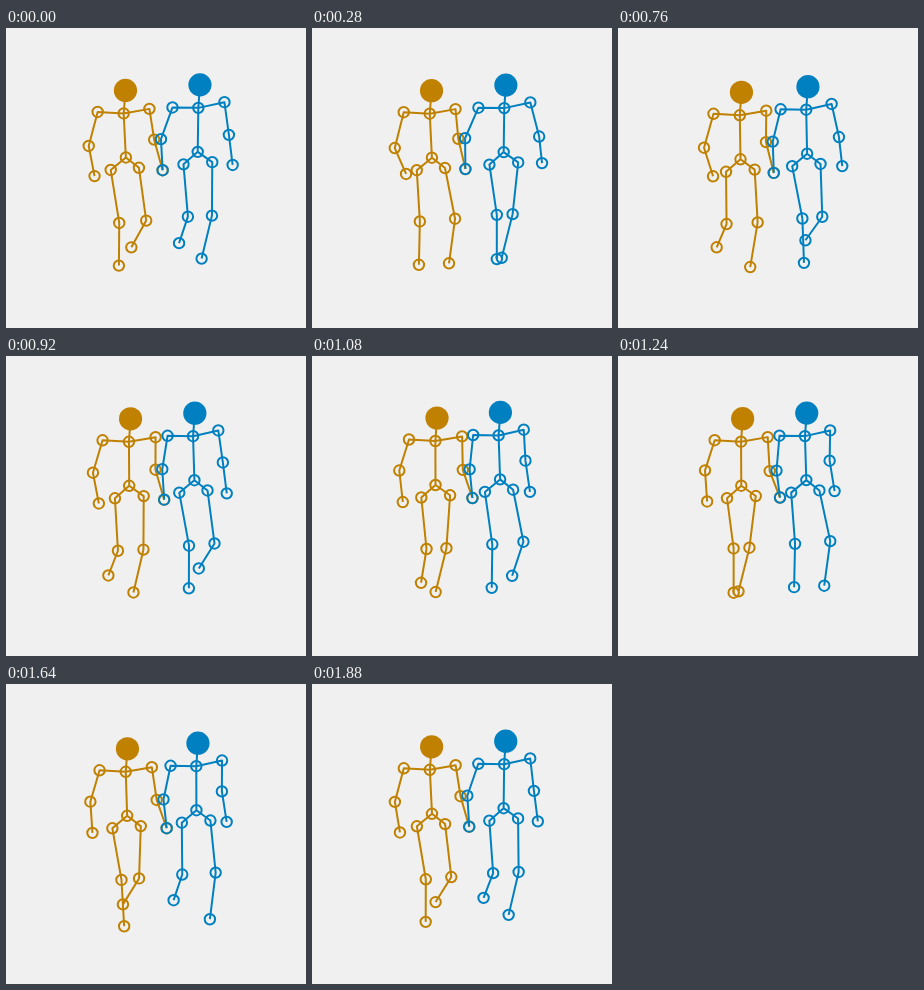
An HTML page that plays this animation: 300x300 px, repeating every 1.92 s.

```html
<!DOCTYPE html>
<html lang="en">
<head>
<meta charset="utf-8">
<title>Walking hand in hand</title>
<style>
  html, body { margin: 0; width: 100%; height: 100%; overflow: hidden; background: #f0f0f0; }
  svg { display: block; width: 100vw; height: 100vh; }
  path, circle { fill: none; stroke: currentColor; stroke-width: 2; stroke-linejoin: round; }
  .head { fill: currentColor; stroke: none; }
</style>
</head>
<body>
<svg id="stage" viewBox="0 0 300 300"></svg>
<script>
const LOOP = 1920, STEP = 40;
const { sin, cos, PI } = Math;

const chains = [
  ["head", "neck", "pelvis"],
  ["neck", "shoulderL", "elbowL", "handL"],
  ["neck", "shoulderR", "elbowR", "handR"],
  ["pelvis", "hipL", "kneeL", "footL"],
  ["pelvis", "hipR", "kneeR", "footR"]
];

// The second walker is the same body half a stride later.
const walkers = [
  { color: "#c08000", phase: 0, x: 0, y: 0, tilt: 0, hipShift: 0, arms: leftWalkerArms },
  { color: "#0080c0", phase: PI, x: 69.2, y: -5.6, tilt: 1.1, hipShift: -0.8, arms: rightWalkerArms }
];

// The body dips twice per stride and sways once.
const bob = a => 1.5 * cos(2 * a + 2.07);
const sway = a => cos(a - 0.56);
const handBob = a => 1.5 * cos(2 * a + 1.05);

function torso(a, { tilt, hipShift }) {
  const at = (x, y, lean) => [x - lean * sway(a), y + bob(a)];
  return {
    head: at(122.1, 63.5, 2.9),
    neck: at(120.4, 86.5, 3),
    shoulderL: at(94.2 + tilt / 2, 85 + tilt, 2.8),
    shoulderR: at(146.6 - tilt / 2, 81.9 - tilt, 3.5),
    pelvis: at(121.6 + hipShift, 130.5, 1.9),
    hipL: at(106.9 + hipShift, 143, 2.4),
    hipR: at(135.4 + hipShift, 140.8, 2.7)
  };
}

// Both legs follow one step cycle; a is the body's phase, p the leg's own.
function knee(x, y, a, p) {
  return [
    x - 5.6 * sin(p) + 1.2 * cos(2 * p - 0.47) + 1.1 * sway(a),
    y + 0.5 * cos(p - 1) + 1.6 * cos(2 * p + 1.24)
  ];
}

function foot(x, y, a, p) {
  return [
    x + 10.2 * cos(p + 1.19) + 1.9 * cos(2 * p - 2.46) + 2.2 * sway(a),
    y + 10.6 * cos(p + 0.52) + 4.8 * cos(2 * p - 2.87)
  ];
}

const legs = a => ({
  kneeL: knee(111.8, 194.5, a, a),
  kneeR: knee(137.3, 192.8, a, a + PI),
  footL: foot(109.5, 233.3, a, a),
  footR: foot(127, 231.9, a, a + PI)
});

// The joined hands and the elbows beside them swing together.
const innerElbow = (x, y, a) => [x - 2.9 * sin(a + 0.16), y - 2.2 * sin(a + 0.35) + bob(a)];
const heldHand = a => [157.7 - 4.7 * sin(a + 0.1), 142.9 - 0.5 * cos(a) + 1.7 * cos(2 * a + 1.41)];

function leftWalkerArms(a) {
  return {
    elbowL: [84.9 - 2.4 * sway(a), 118 + 3 * sin(a + 0.2) + bob(a)],
    handL: [91.2 - 2.9 * sway(a) + 5.8 * sin(a) - 0.8 * cos(2 * a), 147.2 + 0.5 * cos(a) + handBob(a)],
    elbowR: innerElbow(149, 113.7, a),
    handR: heldHand(a)
  };
}

function rightWalkerArms(a) {
  return {
    elbowL: innerElbow(155.8, 113.2, a),
    handL: heldHand(a),
    elbowR: [219.4 + 3 * sway(a) + 5.9 * sin(a), 107.4 + 2.1 * sin(a + 0.1) + bob(a)],
    handR: [223.3 + 3 * sway(a) + 4.7 * sin(a), 136.6 + handBob(a)]
  };
}

function pose(walker, angle) {
  const a = angle + walker.phase;
  const joints = { ...torso(a, walker), ...legs(a) };
  for (const name in joints) {
    const [x, y] = joints[name];
    joints[name] = [x + walker.x, y + walker.y];
  }
  return { ...joints, ...walker.arms(angle) };
}

function add(parent, tag, attributes) {
  const node = document.createElementNS("http://www.w3.org/2000/svg", tag);
  for (const key in attributes) node.setAttribute(key, attributes[key]);
  return parent.appendChild(node);
}

const stage = document.getElementById("stage");
for (const walker of walkers) {
  const group = add(stage, "g", { color: walker.color });
  walker.bones = add(group, "path", {});
  walker.dots = {};
  for (const name of new Set(chains.flat())) {
    walker.dots[name] = add(group, "circle", name === "head" ? { r: 11.6, class: "head" } : { r: 5.2 });
  }
}

function draw(time) {
  const angle = 2 * PI * (time + STEP) / LOOP;
  for (const walker of walkers) {
    const joints = pose(walker, angle);
    const line = chain => "M" + chain.map(name => joints[name].join(" ")).join("L");
    walker.bones.setAttribute("d", chains.map(line).join(""));
    for (const name in walker.dots) {
      const [x, y] = joints[name];
      walker.dots[name].setAttribute("cx", x);
      walker.dots[name].setAttribute("cy", y);
    }
  }
}

let start;
function tick(now) {
  start ??= now;
  draw(Math.floor((now - start) % LOOP / STEP) * STEP);
  requestAnimationFrame(tick);
}
draw(0);
requestAnimationFrame(tick);
</script>
</body>
</html>
```
